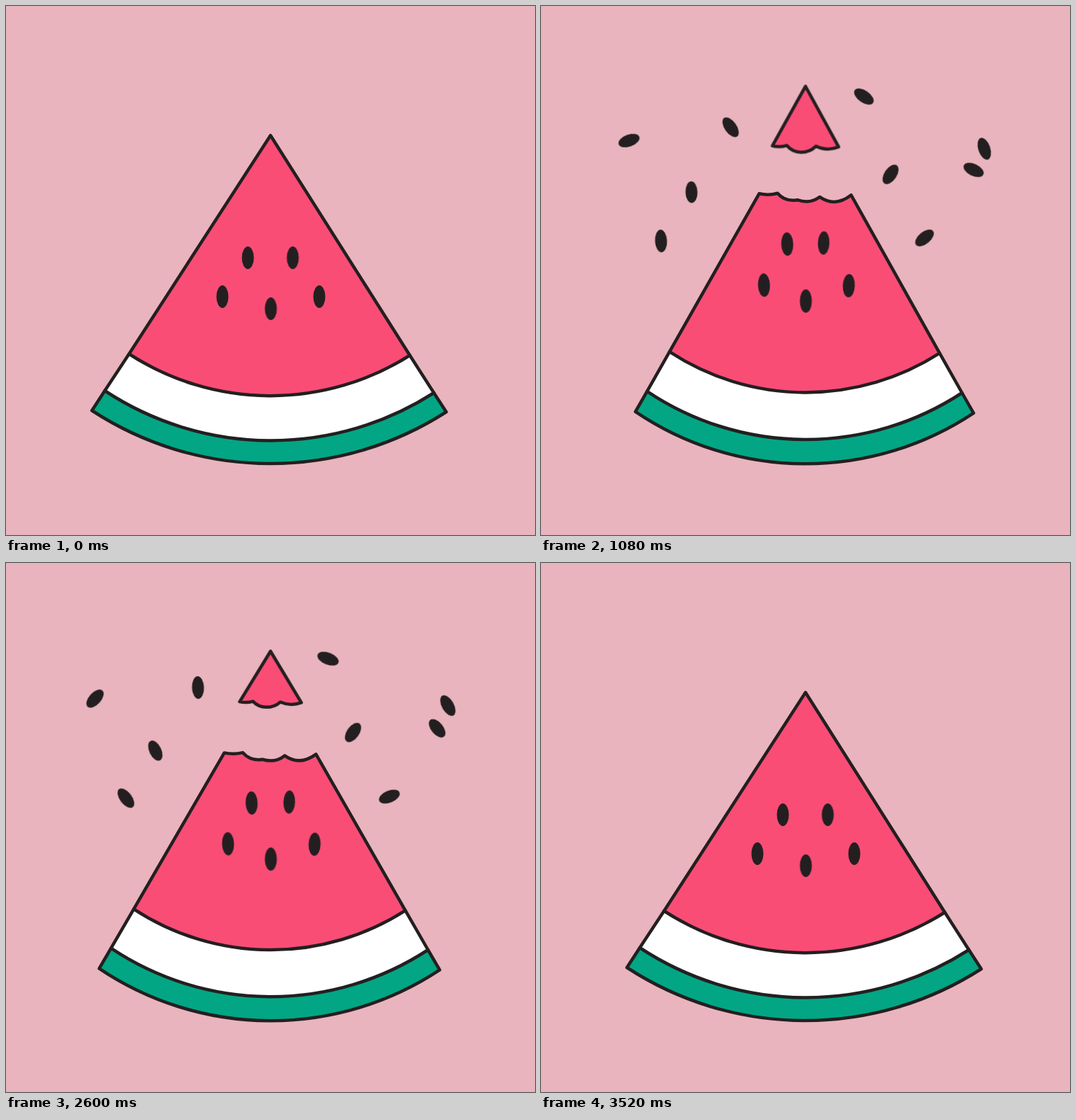
An HTML page without scripts for the animation above (3720 ms loop, 748x748 px).

```html
<!DOCTYPE html>
<html lang="en">
<head>
<meta charset="utf-8">
<title>Watermelon</title>
<style>
html, body { margin: 0; height: 100%; overflow: hidden; background: #e9b4bd; }
svg { display: block; width: 100vw; height: 100vh; }

.shape { stroke: #231f20; stroke-width: 4.5; stroke-linejoin: round; }
.pink { fill: #f94d76; }
.seed, .fly { fill: #231f20; }

.shape, .seed, .fly, .tip, .spray { animation: 3720ms linear infinite; }
.shape { animation-name: morph; }
.seed { animation-name: sway; }
.fly { animation-name: scatter; }
.whole { animation-name: morph, intact; }
.cut { animation-name: morph, broken; }
.tip { animation-name: toss, broken; vector-effect: non-scaling-stroke; }
.spray { animation-name: sprayed; }

/* Poses of the slice */
.rind {
  --rest: path("M139.7 544L121.5 572A461 461 0 0 0 622.5 574L605 547Z");
  --squash: path("M112.5 545L88.5 573A597 597 0 0 0 659 575L633.5 546Z");
  --tall: path("M153 545L137 574A420 420 0 0 0 608.5 576L592.5 547Z");
  fill: #02a684;
}
.pith {
  --rest: path("M174 492L139.7 544A427 427 0 0 0 605 547L571 494Z");
  --squash: path("M155 497L112.5 545A531 531 0 0 0 633.5 546L592 498Z");
  --tall: path("M184 488L153 545A396 396 0 0 0 592.5 547L561.5 490Z");
  fill: #fff;
}
.whole {
  --rest: path("M174 492A368 368 0 0 0 571 494L374 183Z");
  --squash: path("M155 497A444 444 0 0 0 592 498L374 239Z");
  --tall: path("M184 488A346 346 0 0 0 561.5 490L374 139Z");
}
.cut {
  --rest: path("M174 492A368 368 0 0 0 571 494L437 289Q415 300 394 287Q382 299 364 299Q346 299 336 288Q322 290 310 287Z");
  --squash: path("M155 497A444 444 0 0 0 592 498L441 318Q415 330 394 316Q382 328 364 328Q346 328 336 317Q322 320 307 318Z");
  --tall: path("M184 488A346 346 0 0 0 561.5 490L439 261Q416 281 394 265Q380 275 362 267Q345 271 334 258Q322 262 308 259Z");
}

@keyframes morph {
  0% { d: var(--rest); animation-timing-function: cubic-bezier(.4,0,.5,1); }
  13.44%, 14.6% { d: var(--squash); animation-timing-function: cubic-bezier(.01,.95,.1,1); }
  21.5% { d: var(--tall); animation-timing-function: cubic-bezier(.37,0,.63,1); }
  45.43% { d: var(--rest); animation-timing-function: cubic-bezier(.37,0,.63,1); }
  64.68% { d: var(--tall); animation-timing-function: cubic-bezier(.37,0,.63,1); }
  77.96%, 79.57% { d: var(--rest); animation-timing-function: cubic-bezier(.3,0,.4,1); }
  83.87% { d: var(--squash); animation-timing-function: cubic-bezier(.3,0,.3,1); }
  92.47%, 100% { d: var(--rest); }
}
@keyframes sway {
  0% { transform: var(--rest); animation-timing-function: cubic-bezier(.4,0,.5,1); }
  13.44%, 14.6% { transform: var(--squash); animation-timing-function: cubic-bezier(.01,.95,.1,1); }
  21.5% { transform: var(--tall); animation-timing-function: cubic-bezier(.37,0,.63,1); }
  45.43% { transform: var(--rest); animation-timing-function: cubic-bezier(.37,0,.63,1); }
  64.68% { transform: var(--tall); animation-timing-function: cubic-bezier(.37,0,.63,1); }
  77.96%, 79.57% { transform: var(--rest); animation-timing-function: cubic-bezier(.3,0,.4,1); }
  83.87% { transform: var(--squash); animation-timing-function: cubic-bezier(.3,0,.3,1); }
  92.47%, 100% { transform: var(--rest); }
}

/* Bitten-off tip */
@keyframes toss {
  0%, 15.05% { transform: translate(374px,150px) scale(1.1,1.25); animation-timing-function: cubic-bezier(.1,.7,.4,1); }
  21.5% { transform: translate(374px,80px) scale(.863,1.12); animation-timing-function: cubic-bezier(.37,0,.63,1); }
  38.71% { transform: translate(374px,163px) scale(1); animation-timing-function: cubic-bezier(.4,0,.75,.8); }
  55.91% { transform: translate(374px,135px) scale(.88,.925); animation-timing-function: cubic-bezier(.3,.4,.6,1); }
  65.8% { transform: translate(374px,122px) scale(.84,.89); animation-timing-function: cubic-bezier(.5,0,.9,.7); }
  75.27% { transform: translate(374px,138px) scale(.93,1); }
  78.49% { transform: translate(374px,174px) scale(1.12,1.27); }
  79.57%, 100% { transform: translate(374px,183px) scale(1.25,1.3); }
}

/* Loose seeds */
@keyframes scatter {
  0%, 15.05% { transform: var(--home); animation-timing-function: cubic-bezier(.2,.6,.5,.9); }
  21.5% { transform: var(--burst); animation-timing-function: cubic-bezier(.1,.7,.3,1); }
  38.71% { transform: var(--far); animation-timing-function: ease-out; }
  55.91%, 60.22% { transform: var(--end); animation-timing-function: cubic-bezier(.7,0,.84,.2); }
  78.49% { transform: var(--back, var(--home)); }
  80.65%, 100% { transform: var(--home); }
}

@keyframes intact {
  0%, 79.57%, 100% { visibility: visible; animation-timing-function: step-end; }
  15.86% { visibility: hidden; animation-timing-function: step-end; }
}
@keyframes broken {
  0%, 79.57%, 100% { visibility: hidden; animation-timing-function: step-end; }
  15.86% { visibility: visible; animation-timing-function: step-end; }
}
@keyframes sprayed {
  0%, 80.65%, 100% { visibility: hidden; animation-timing-function: step-end; }
  15.86% { visibility: visible; animation-timing-function: step-end; }
}

.s1 {
  --rest: translate(342px,356px) rotate(0deg) scale(1,1);
  --squash: translate(332px,384px) rotate(12deg) scale(1.02,.87);
  --tall: translate(350px,331px) rotate(-3deg) scale(1,1.04);
}
.s2 {
  --rest: translate(405.5px,356px) rotate(0deg) scale(1,1);
  --squash: translate(417px,385px) rotate(-10deg) scale(1.02,.87);
  --tall: translate(398px,329px) rotate(3deg) scale(.95,1.04);
}
.s3 {
  --rest: translate(306px,411px) rotate(0deg) scale(1,1);
  --squash: translate(278.5px,422px) rotate(20deg) scale(1.04,.87);
  --tall: translate(318px,390px) rotate(-3deg) scale(1,1.04);
}
.s4 {
  --rest: translate(443px,411px) rotate(0deg) scale(1,1);
  --squash: translate(471px,425px) rotate(-18deg) scale(1.02,.87);
  --tall: translate(433px,391px) rotate(3deg) scale(1,1.04);
}
.s5 {
  --rest: translate(374.5px,428px) rotate(0deg) scale(1,1);
  --squash: translate(374.5px,456px) rotate(0deg) scale(1.22,.88);
  --tall: translate(374.5px,414px) rotate(0deg) scale(1,1.04);
}

.a {
  --home: translate(332px,282px) rotate(-110deg);
  --burst: translate(176px,209px) rotate(-30deg);
  --far: translate(118px,188px) rotate(-120deg);
  --end: translate(108px,184px) rotate(-140deg);
}
.b {
  --home: translate(346px,281px) rotate(60deg);
  --burst: translate(285px,199px) rotate(5deg);
  --far: translate(266px,168px) rotate(162deg);
  --end: translate(265px,167px) rotate(188deg);
}
.c {
  --home: translate(340px,281px) rotate(60deg);
  --burst: translate(275.5px,249px) rotate(50deg);
  --far: translate(205px,265px) rotate(-8deg);
  --end: translate(200px,264px) rotate(-33deg);
}
.d {
  --home: translate(374px,288px) rotate(-90deg);
  --burst: translate(191.5px,318px) rotate(-61deg);
  --far: translate(167px,334px) rotate(-198deg);
  --end: translate(165px,335px) rotate(-222deg);
  --back: translate(222px,304px) rotate(-163deg);
}
.e {
  --home: translate(413px,277px) rotate(-110deg);
  --burst: translate(449px,152.5px) rotate(-15deg);
  --far: translate(457.5px,125px) rotate(-60deg);
  --end: translate(459px,123px) rotate(-65deg);
}
.f {
  --home: translate(418px,270px) rotate(40deg);
  --burst: translate(432px,247px) rotate(50deg);
  --far: translate(502px,237px) rotate(32deg);
  --end: translate(497px,237px) rotate(35deg);
}
.g {
  --home: translate(374px,288px) rotate(90deg);
  --burst: translate(536.5px,238px) rotate(42deg);
  --far: translate(621px,231px) rotate(125deg);
  --end: translate(630px,229px) rotate(145deg);
}
.h {
  --home: translate(374px,285px) rotate(60deg);
  --burst: translate(601px,209px) rotate(8deg);
  --far: translate(630px,201px) rotate(-22deg);
  --end: translate(634px,199px) rotate(-32deg);
  --back: translate(518.5px,232px) rotate(0deg);
}
.i {
  --home: translate(375px,288px) rotate(80deg);
  --burst: translate(480px,287.5px) rotate(90deg);
  --far: translate(550px,333px) rotate(248deg);
  --end: translate(556.5px,334px) rotate(262deg);
}
</style>
</head>
<body>
<svg viewBox="0 0 748 748">
  <g class="spray">
    <ellipse class="fly a" rx="8.5" ry="15.5"/>
    <ellipse class="fly b" rx="8.5" ry="16"/>
    <ellipse class="fly c" rx="8.5" ry="15.2"/>
    <ellipse class="fly d" rx="8.5" ry="16"/>
    <ellipse class="fly e" rx="8.5" ry="15.8"/>
    <ellipse class="fly f" rx="8.7" ry="15.5"/>
    <ellipse class="fly g" rx="8.5" ry="15.2"/>
    <ellipse class="fly h" rx="8.5" ry="16"/>
    <ellipse class="fly i" rx="8.5" ry="15.5"/>
  </g>
  <path class="shape rind"/>
  <path class="shape pith"/>
  <path class="shape pink whole"/>
  <path class="shape pink cut"/>
  <path class="shape pink tip" d="M0 0L-51 78.5Q-40 81-29 78Q-20 87-7 87Q7 87 16 79Q33 86 51 80Z"/>
  <ellipse class="seed s1" rx="8.5" ry="16"/>
  <ellipse class="seed s2" rx="8.5" ry="16"/>
  <ellipse class="seed s3" rx="8.5" ry="16"/>
  <ellipse class="seed s4" rx="8.5" ry="16"/>
  <ellipse class="seed s5" rx="8.5" ry="16"/>
</svg>
</body>
</html>
```
